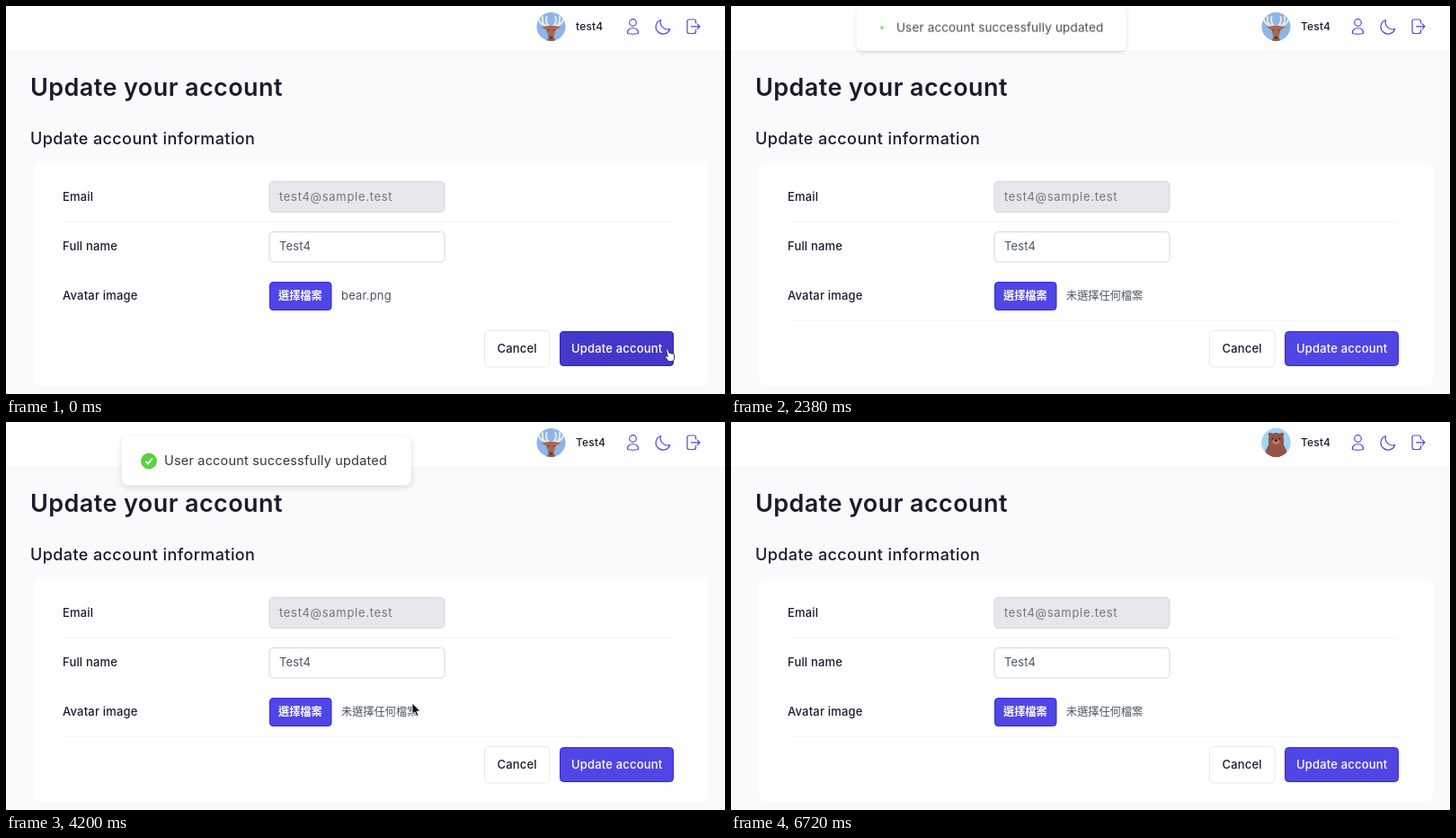
Write an HTML page that moves like this. It is 800 px wide and 432 px high and loops after 6.79 s.

```html
<!DOCTYPE html>
<html lang="en">
<head>
<meta charset="utf-8">
<title>Update your account</title>
<style>
  html, body { margin: 0; width: 100%; height: 100%; overflow: hidden; background: #f9fafb; }
  svg { display: block; width: 800px; height: 432px; }
  text { font: 500 13px Inter, "Noto Sans CJK TC", "Noto Sans CJK", sans-serif; fill: #1a1c2e; letter-spacing: .18px; }
  .title { font-size: 27px; font-weight: 600; letter-spacing: .42px; }
  .subtitle { font-size: 18px; letter-spacing: .4px; }
  .value { font-weight: 400; fill: #4b5563; }
  .muted { fill: #74777f; }
  .email { letter-spacing: .7px; }
  .name { font-size: 12px; }
  .cjk { font: 400 12.2px "Noto Sans CJK TC", "Noto Sans CJK", sans-serif; letter-spacing: 0; }
  .on { fill: #fff; }
  .bold { font-weight: 700; }
  .note { font-size: 14.5px; font-weight: 400; fill: #363636; }
  .field { fill: #fff; stroke: #d1d5db; }
  .off { fill: #e5e7eb; }
  .button { fill: #4f46e5; stroke: #3a2bd0; }
  .dark { fill: #4338ca; stroke: #3527b4; }
  .icon { fill: none; stroke: #4f46e5; stroke-width: 1.2; stroke-linecap: round; stroke-linejoin: round; }
  .rule { stroke: #f3f4f6; }

  .a { animation: 6790ms step-end infinite; }
  .before { animation-name: before; }
  .busy { animation-name: busy; }
  .after { animation-name: after; }
  .filed { animation-name: filed; }
  .hover { animation-name: hover; }
  .hand { animation-name: hand; }
  .ban { animation-name: ban; }
  .arrow { animation-name: arrow; }
  .fresh { animation-name: fresh; }
  .path { animation: path 6790ms linear infinite; }
  .toast { animation: toast 6790ms linear infinite; transform-origin: 290px 44px; filter: drop-shadow(0 2px 3px rgba(0,0,0,.15)); }
  .tick { animation: tick 6790ms linear infinite; transform-origin: 159px 43px; }

  @keyframes before { 0% { opacity: 1 } 32.99%, 100% { opacity: 0 } }
  @keyframes after { 0% { opacity: 0 } 32.99%, 100% { opacity: 1 } }
  @keyframes busy { 0% { opacity: 0 } 5.15% { opacity: 1 } 32.99%, 100% { opacity: 0 } }
  @keyframes filed { 0% { opacity: 1 } 5.15%, 100% { opacity: 0 } }
  @keyframes hover { 0% { opacity: 1 } 22.68%, 100% { opacity: 0 } }
  @keyframes hand { 0% { opacity: 1 } 5.15%, 100% { opacity: 0 } }
  @keyframes ban { 0% { opacity: 0 } 5.15% { opacity: 1 } 23.71%, 100% { opacity: 0 } }
  @keyframes arrow { 0% { opacity: 0 } 5.15% { opacity: 1 } 23.71% { opacity: 0 } 58.76% { opacity: 1 } 85.57%, 100% { opacity: 0 } }
  @keyframes fresh { 0% { opacity: 0 } 88.66%, 100% { opacity: 1 } }
  @keyframes path {
    0%, 21.65% { transform: translate(736px, 380px) }
    23.71% { transform: translate(738px, 436px) }
    23.72%, 58.76% { transform: translate(436px, 400px); animation-timing-function: ease-out }
    61.86%, 64.95% { transform: translate(452px, 313px); animation-timing-function: ease-in-out }
    74.23%, 77.32% { transform: translate(566px, 287px); animation-timing-function: ease-in }
    84.54%, 100% { transform: translate(684px, 21px) }
  }
  @keyframes toast {
    0%, 32.98% { opacity: 0; transform: translateY(-110px) scale(.6) }
    32.99% { opacity: .5; transform: translateY(-110px) scale(.6); animation-timing-function: cubic-bezier(.21,1.02,.73,1) }
    38.14%, 77.32% { opacity: 1; transform: none; animation-timing-function: cubic-bezier(.06,.71,.55,1) }
    83.21%, 100% { opacity: 0; transform: translateY(-83px) scale(.6) }
  }
  @keyframes tick {
    0%, 34.46% { transform: scale(0) rotate(45deg); animation-timing-function: ease-out }
    38.88%, 100% { transform: none }
  }
</style>
</head>
<body>
<svg viewBox="0 0 800 432">
  <defs>
    <clipPath id="round"><circle cx="606.5" cy="23" r="16"/></clipPath>
  </defs>

  <rect width="800" height="432" fill="#f9fafb"/>
  <rect width="800" height="50" fill="#fff"/>
  <path d="M0 50.5H800" stroke="#f1f3f5"/>

  <!-- avatars -->
  <g clip-path="url(#round)">
    <rect x="590" y="7" width="33" height="33" fill="#8db5e6"/>
    <path d="M604 22Q594 22 592.500 14M599 21Q596 17 597 12M603 21Q600 17 601.500 12M609 22Q619 22 620.500 14M614 21Q617 17 616 12M610 21Q613 17 611.500 12" fill="none" stroke="#eee6e0" stroke-width="2" stroke-linecap="round"/>
    <path d="M596 23.500L603 22H610L617 23.500L611.500 27L609 36Q606.500 39 604 36L601.500 27Z" fill="#a9684f"/>
    <path d="M601 40L604 34H609L612 40Z" fill="#955943"/>
    <ellipse cx="606.500" cy="35" rx="2" ry="1.500" fill="#5c3630"/>
    <circle cx="603.500" cy="27" r=".8" fill="#3c2422"/>
    <circle cx="609.500" cy="27" r=".8" fill="#3c2422"/>
    <g class="a fresh">
      <rect x="590" y="7" width="33" height="33" fill="#a5d4f8"/>
      <g fill="#945443">
        <circle cx="600" cy="14" r="2.300"/>
        <circle cx="613" cy="14" r="2.300"/>
        <path d="M598 20Q598 12 606.500 12T615 20V26Q619 31 619 40H594Q594 31 598 26Z"/>
      </g>
      <ellipse cx="606.500" cy="22" rx="4" ry="3" fill="#b77d68"/>
      <ellipse cx="606.500" cy="20.500" rx="1.800" ry="1.200" fill="#3b2326"/>
      <circle cx="602.500" cy="18.500" r=".9" fill="#3b2326"/>
      <circle cx="610.500" cy="18.500" r=".9" fill="#3b2326"/>
    </g>
  </g>

  <text class="name a before" x="634" y="27">test4</text>
  <text class="name a after" x="634" y="27">Test4</text>

  <g class="icon">
    <circle cx="697.500" cy="18.500" r="3.800"/>
    <path d="M691.500 30.500C690.500 22.500 704.500 22.500 703.500 30.500Q697.500 32 691.500 30.500Z"/>
    <path d="M728.500 15.500A8 8 0 1 0 738.700 25.500A8 8 0 0 1 728.500 15.500Z"/>
    <path d="M767.500 19V17Q767.500 15 765.500 15H760Q758 15 758 17V28.500Q758 30.500 760 30.500H765.500Q767.500 30.500 767.500 28.500V26.500M762.500 22.800H772M769.200 20L772 22.800L769.200 25.600"/>
  </g>

  <text class="title" x="27" y="100">Update your account</text>
  <text class="subtitle" x="27" y="153.500">Update account information</text>

  <rect x="31" y="175" width="750" height="248" rx="7" fill="#fff"/>
  <path class="rule" d="M64 240.500H742"/>
  <path class="rule a after" d="M64 350.500H742"/>

  <text x="63" y="216.500">Email</text>
  <text x="63" y="272">Full name</text>
  <text x="63" y="327">Avatar image</text>

  <rect class="field off" x="293" y="195.500" width="195" height="34" rx="4.500"/>
  <text class="value muted email" x="304" y="216.500">test4@sample.test</text>

  <rect class="field" x="293" y="251.500" width="195" height="33.500" rx="4.500"/>
  <text class="value" x="304" y="272">Test4</text>
  <g class="a busy">
    <rect class="field off" x="293" y="251.500" width="195" height="33.500" rx="4.500"/>
    <text class="value muted" x="304" y="272">Test4</text>
    <rect class="off" x="293" y="307" width="195" height="32" rx="4.500"/>
    <text class="value muted" x="373" y="327">bear.png</text>
  </g>
  <text class="value a filed" x="373" y="327">bear.png</text>
  <text class="value cjk a after" x="373" y="327">未選擇任何檔案</text>

  <rect class="button" x="293.500" y="307.500" width="68.500" height="31" rx="3.500"/>
  <text class="cjk bold on" x="303" y="327">選擇檔案</text>

  <rect x="532.500" y="361.500" width="72.500" height="40.500" rx="4.500" fill="#fff" stroke="#e5e7eb"/>
  <text x="546.500" y="385.500">Cancel</text>
  <rect class="button" x="616.500" y="362.500" width="126" height="38" rx="4"/>
  <rect class="button dark a hover" x="616.500" y="362.500" width="126" height="38" rx="4"/>
  <text class="on" x="629" y="385.500">Update account</text>

  <g class="toast">
    <rect x="128.500" y="16" width="322.500" height="54.500" rx="7" fill="#fff"/>
    <g class="tick">
      <circle cx="159" cy="43.500" r="9" fill="#5bd040"/>
      <path d="M155.300 43.800L158 46.500L162.700 40.500" fill="none" stroke="#fff" stroke-width="1.900"/>
    </g>
    <text class="note" x="176" y="48">User account successfully updated</text>
  </g>

  <g class="path">
    <g class="a arrow">
      <path d="M0 0V12.500L2.900 9.900L4.900 14.500L7 13.600L5 9.100H9Z" fill="#111" stroke="#fff" stroke-width=".9"/>
    </g>
    <g class="a ban" fill="#fff" stroke="#8b8d94" stroke-width="1.700">
      <circle cx="8" cy="20" r="6.500"/>
      <path d="M3.500 15.500L12.500 24.500"/>
    </g>
    <g class="a hand">
      <path d="M-1.500 3Q-.5 1.200 .8 3L2.300 6.600Q3.600 5.600 4.300 7Q5.600 6.300 6.200 7.600Q7.500 7.300 7.700 8.700V12.500L6 15.800H1.200L-2.600 11Q-3.200 9.200 -1.300 9.700L.2 10.600Z" fill="#fff" stroke="#222" stroke-width="1" stroke-linejoin="round"/>
    </g>
  </g>
</svg>
</body>
</html>
```
